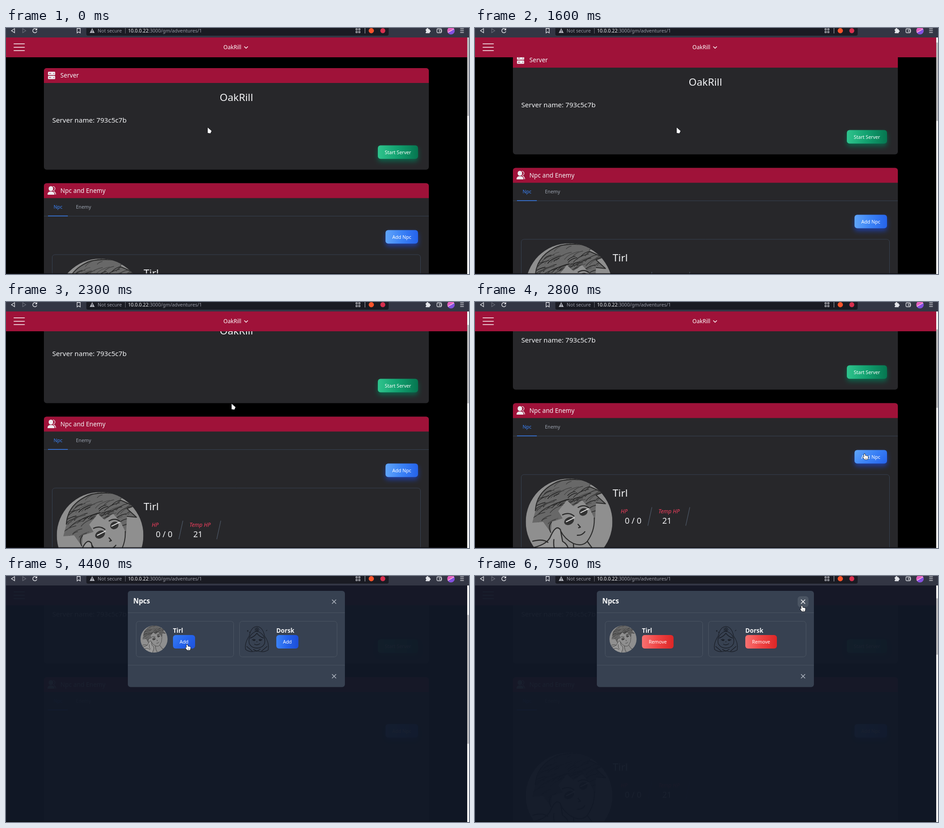
An HTML page with a canvas for the animation above (8 s loop, 1026 by 546 pixels).

```html
<!DOCTYPE html>
<html lang="en">
<head>
<meta charset="utf-8">
<title>Adventure manager</title>
<style>
html, body { margin: 0; width: 100%; height: 100%; overflow: hidden; background: #000; }
canvas { display: block; }
</style>
</head>
<body>
<canvas id="stage" width="1026" height="546"></canvas>
<script>
const ctx = document.getElementById('stage').getContext('2d');
const LOOP = 8000;
const ROSE = '#9f1239', PANEL = '#27272a', LINE = '#374151', SLATE = '#374151', EDGE = '#4b5563';
const RED = ['#f87171', '#ef4444', '#dc2626'];
const BLUE = ['#3b82f6', '#2563eb', '#1d4ed8'];
const SKY = ['#60a5fa', '#3b82f6', '#2563eb'];
const GREEN = ['#2fc48d', '#12a06f', '#067650'];
const ADVENTURE = 'OakRill', NPCS = ['Tirl', 'Dorsk'];

// time, scroll, pointer x, pointer y, shape
const POINTER = [
  [0, 0, 447, 221, 'arrow'],
  [1400, 10, 447, 221, 'arrow'],
  [1500, 22, 447, 221, 'arrow'],
  [1600, 34, 447, 221, 'arrow'],
  [1700, 40, 447, 221, 'arrow'],
  [1900, 56, 470, 221, 'arrow'],
  [2000, 70, 476, 222, 'arrow'],
  [2100, 80, 480, 223, 'arrow'],
  [2300, 90, 500, 226, 'arrow'],
  [2400, 103, 560, 244, 'arrow'],
  [2500, 115, 650, 276, 'arrow'],
  [2600, 120, 752, 310, 'arrow'],
  [2700, 120, 830, 330, 'arrow'],
  [2800, 120, 864, 337, 'hand'],
  [4100, 120, 402, 152, 'hand'],
  [5900, 120, 729, 114, 'arrow'],
  [6300, 120, 674, 165, 'arrow'],
  [6600, 120, 622, 148, 'hand'],
  [7200, 120, 727, 74, 'arrow'],
  [7500, 120, 725, 66, 'hand']
];

function text(str, x, y, size, color, font = '400', align = 'left') {
  ctx.font = `${font} ${size}px "Noto Sans", sans-serif`;
  ctx.textAlign = align;
  ctx.fillStyle = color;
  ctx.fillText(str, x, y);
}

function rect(x, y, w, h, color) {
  ctx.fillStyle = color;
  ctx.fillRect(x, y, w, h);
}

function round(x, y, w, h, r) {
  ctx.beginPath();
  ctx.roundRect(x, y, w, h, r);
}

function fillRound(x, y, w, h, r, color) {
  round(x, y, w, h, r);
  ctx.fillStyle = color;
  ctx.fill();
}

function strokeRound(x, y, w, h, r, color, width = 1) {
  round(x, y, w, h, r);
  ctx.strokeStyle = color;
  ctx.lineWidth = width;
  ctx.stroke();
}

function dot(x, y, r, color) {
  ctx.beginPath();
  ctx.arc(x, y, r, 0, Math.PI * 2);
  ctx.fillStyle = color;
  ctx.fill();
}

function path(points, color, width = 1, closed = false) {
  ctx.beginPath();
  points.forEach(([x, y]) => ctx.lineTo(x, y));
  if (closed) ctx.closePath();
  ctx.strokeStyle = color;
  ctx.lineWidth = width;
  ctx.stroke();
}

function polygon(points, color) {
  ctx.beginPath();
  points.forEach(([x, y]) => ctx.lineTo(x, y));
  ctx.closePath();
  ctx.fillStyle = color;
  ctx.fill();
}

function curve(d, color, width) {
  ctx.strokeStyle = color;
  ctx.lineWidth = width;
  ctx.stroke(new Path2D(d));
}

function random(seed) {
  return () => (seed = (seed * 16807) % 2147483647) / 2147483647;
}

function button(label, x, y, w, colors, hover, glow) {
  const h = 30;
  const g = hover ? ctx.createLinearGradient(x + w / 2 - 25, y - 10, x + w / 2 + 25, y + h + 10)
                  : ctx.createLinearGradient(x, y, x + w, y);
  colors.forEach((c, i) => g.addColorStop(i / 2, c));
  ctx.save();
  if (glow) {
    ctx.shadowColor = glow;
    ctx.shadowBlur = 11;
    ctx.shadowOffsetY = 6;
  }
  fillRound(x, y, w, h, 6, g);
  ctx.restore();
  text(label, x + w / 2, y + 19, 10.57, '#fff', '500', 'center');
}

function cross(x, y, color) {
  path([[x - 4.5, y - 4.5], [x + 4.5, y + 4.5]], color, 1.4);
  path([[x + 4.5, y - 4.5], [x - 4.5, y + 4.5]], color, 1.4);
}

function portrait(cx, cy, r) {
  ctx.save();
  ctx.translate(cx, cy);
  ctx.scale(r, r);
  ctx.beginPath();
  ctx.arc(0, 0, 1, 0, Math.PI * 2);
  ctx.clip();
  rect(-1, -1, 2, 2, '#8f8f8f');
  const ink = '#2b2b2b';
  ctx.save();
  const hair = new Path2D('M-.78-.25L-.72-.55-.5-.8-.3-.93 0-1 .3-.97 .56-.9 .46-.82 .78-.68 .62-.62 .84-.42 .62-.44 .6-.05 .48-.3 .3-.5 .1-.36-.05-.5-.25-.25-.15-.08-.4 0-.42.25-.6 0-.85.02Z');
  ctx.fillStyle = '#686868';
  ctx.fill(hair);
  ctx.clip(hair);
  const rnd = random(77);
  for (let i = 0; i < 110; i++) {
    const x = -.9 + rnd() * 1.8, y = -1 + rnd() * 1.1, l = .12 + rnd() * .3;
    const shade = 30 + Math.floor(rnd() * 50);
    curve(`M${x} ${y}q${l * .3} ${-l * .4} ${l} ${-l * .55}`, `rgb(${shade},${shade},${shade})`, .015);
  }
  ctx.restore();
  ctx.lineJoin = 'round';
  curve('M-.78-.25Q-.75-.75-.2-.95Q.25-1.03.56-.9M.46-.82L.78-.68 .62-.62 .84-.42 .62-.44M-.4 0Q-.5.1-.42.25M.58-.1Q.6.2.42.45Q.3.58.1.5Q-.1.4-.2.2', ink, .022);
  for (const [x, y, a] of [[0, -.02, .12], [.33, -.23, .1]]) {
    ctx.beginPath();
    ctx.ellipse(x, y, a, .085, -.5, 0, Math.PI * 2);
    ctx.fillStyle = '#333';
    ctx.fill();
    path([[x - .07, y + .02], [x + .13, y - .08]], '#ddd', .022);
  }
  curve('M-.16-.16Q0-.24.12-.13M.2-.33Q.35-.42.46-.32M.2.05l.06.07-.05.02M.18.31Q.3.32.37.22', ink, .026);
  ctx.fillStyle = '#999';
  const hand = new Path2D('M-.95.62Q-.5.55-.42.32Q-.3.05-.2.18L-.15.45Q.02.55-.02.75L-.15 1.1-.9 1.1Z');
  ctx.fill(hand);
  curve('M-.95.62Q-.5.55-.42.32Q-.3.05-.2.18L-.15.45Q.02.55-.02.75L-.15 1.1M-.85.45Q-.6.38-.48.48M-.35.4Q-.38.65-.25.75M-.7.72Q-.45.6-.3.8M.1.5Q.1.75.25 1M.42.45L.6.7Q.75.78.8.6', ink, .025);
  ctx.restore();
}

function hoodedFigure(cx, cy) {
  const ink = '#191d25';
  ctx.save();
  ctx.translate(cx, cy);
  ctx.lineJoin = 'round';
  curve('M-25 23Q-28 10-17-7Q-13-27 0-28Q13-27 17-7Q28 8 25 24Q15 31 0 26Q-15 31-25 23Z', ink, 1.2);
  curve('M-17 10Q-21-10 0-18Q21-10 17 10Q12 20 0 20Q-12 20-17 10Z', ink, 1.3);
  curve('M-15-2Q-5-6 0-13Q5-6 15-2M-11 2q4-3 8 0M4 2q4-3 8 0M-6 11Q0 15 7 10M-1 6h2M-23 16L-10 27M23 16L10 27M-8 23L0 27 8 22', ink, 1.4);
  curve('M-9 3h5M5 3h5', ink, 2);
  for (let i = 0; i < 5; i++) {
    const a = i * Math.PI * .4;
    ctx.beginPath();
    ctx.arc(Math.cos(a) * 3, -21 + Math.sin(a) * 3, 1.8, 0, Math.PI * 2);
    ctx.lineWidth = .9;
    ctx.stroke();
  }
  curve('M-22-18l3-1M-20-20v4M20-18l3-2M-17-16l2 2', ink, 1.1);
  ctx.restore();
}

function browserBar() {
  const light = '#e4e5ea', dim = '#9a9ca7';
  rect(0, 0, 1026, 21, '#333644');
  fillRound(178, -6, 670, 23, 4, '#1a1b23');
  path([[19, 1.5], [12, 6], [19, 10.5]], light, 1.3, true);
  path([[37, 1.5], [44, 6], [37, 10.5]], '#70737f', 1.1, true);
  ctx.beginPath();
  ctx.arc(64, 6, 4.6, .3, 5.4);
  ctx.strokeStyle = light;
  ctx.lineWidth = 1.5;
  ctx.stroke();
  polygon([[69, 0], [69, 5], [64.5, 5]], light);
  path([[157.5, 1], [164.5, 1], [164.5, 11], [161, 8.5], [157.5, 11]], light, 1.3, true);
  polygon([[191, .5], [196.5, 11], [185.5, 11]], '#b5b7bf');
  rect(190.4, 4, 1.2, 3.5, '#1a1b23');
  rect(190.4, 8.5, 1.2, 1.2, '#1a1b23');
  text('Not secure', 203, 10, 10.57, dim);
  rect(264, 0, 1, 12, '#6b6d77');
  const host = '10.0.0.22';
  text(host, 270.5, 10, 10.7, '#f3f4f6');
  text(':3000/gm/adventures/1', 270.5 + ctx.measureText(host).width, 10, 10.7, dim);
  for (const [x, y] of [[775.5, 1.5], [781.5, 1.5], [775.5, 7.5], [781.5, 7.5]]) {
    ctx.strokeStyle = '#c5c6cc';
    ctx.lineWidth = 1.2;
    ctx.strokeRect(x, y, 3, 3);
  }
  rect(795, 0, 1, 12, '#b5b7bf');
  dot(809.5, 6, 5.8, '#fb542b');
  dot(835, 6, 5.5, '#d8304f');
  fillRound(930, 2.5, 9, 9, 1, light);
  dot(934, 2.2, 2, light);
  dot(939, 7, 2, light);
  dot(930, 7.5, 1.4, '#333644');
  strokeRound(955, 2, 10, 8.5, 1.5, light, 1.3);
  strokeRound(960, 4.5, 5.5, 3.5, 1, light, 1.2);
  dot(986, 6, 8.2, '#e35fbd');
  ctx.beginPath();
  ctx.arc(986, 6, 8.2, -.45, 2.5);
  ctx.fillStyle = '#8250df';
  ctx.fill();
  path([[979, 10], [993, 2]], '#f2d4ee', 1.2);
  for (const y of [2, 6, 10]) rect(1006.5, y - .6, 8, 1.3, light);
}

function panelHead(y, title) {
  fillRound(84, y, 853, 33, [6, 6, 0, 0], ROSE);
  text(title, 120.5, y + 21.2, 13.6, '#f3f4f6');
}

function serverIcon(y) {
  for (const dy of [0, 9]) {
    fillRound(93, y + dy, 16, 7.5, 1.5, '#eceaee');
    rect(95.5, y + dy + 3.2, 4, 1.2, ROSE);
    dot(106, y + dy + 3.8, .9, ROSE);
  }
}

function peopleIcon(y) {
  const c = '#eceaee';
  ctx.beginPath();
  ctx.arc(104, y + 5.5, 4.6, -1.6, 1.6);
  ctx.strokeStyle = c;
  ctx.lineWidth = 1.4;
  ctx.stroke();
  curve(`M106 ${y + 12}Q110 ${y + 14} 110 ${y + 18.5}`, c, 1.6);
  ctx.beginPath();
  ctx.ellipse(99.5, y + 5.5, 5, 5.6, 0, 0, Math.PI * 2);
  ctx.fillStyle = c;
  ctx.fill();
  fillRound(92, y + 12, 15.5, 7, [6, 6, 1, 1], c);
}

function npcCard(y) {
  strokeRound(102.5, y + .5, 816, 640, 6, LINE);
  portrait(208.5, y + 105.5, 96);
  text(NPCS[0], 305, y + 49, 22.65, '#f3f4f6');
  text('HP', 323, y + 86, 12.1, '#f43f5e', 'italic 400');
  text('Temp HP', 406.5, y + 86, 12.1, '#f43f5e', 'italic 400');
  text('0 / 0', 332, y + 109.5, 18.1, '#f3f4f6');
  text('21', 415, y + 109.5, 18.1, '#f3f4f6');
  for (const x of [392, 476]) path([[x, y + 73], [x - 9, y + 114]], EDGE, 1.3);
}

function page(scroll, hover, hasNpc) {
  rect(0, 21, 1026, 525, '#000');
  ctx.save();
  ctx.translate(0, -scroll);
  fillRound(84, 89, 853, 225.5, 6, PANEL);
  panelHead(89, 'Server');
  serverIcon(97);
  text(ADVENTURE, 510.5, 161.5, 22.65, '#f3f4f6', '400', 'center');
  text('Server name: 793c5c7b', 102.5, 210, 15.1, '#f3f4f6');
  button('Start Server', 824, 260.5, 89, GREEN, false, 'rgba(6,110,80,.8)');

  fillRound(84, 344.5, 853, 900, 6, PANEL);
  panelHead(344.5, 'Npc and Enemy');
  peopleIcon(351);
  text('Npc', 105.5, 401, 10.57, '#3b82f6', '500');
  text('Enemy', 155, 401, 10.57, '#9ca3af', '500');
  rect(84, 417, 853, 1, LINE);
  rect(93, 416.5, 44, 1.5, '#3b82f6');
  button('Add Npc', 841, 448.5, 72, SKY, hover, 'rgba(30,64,175,.85)');
  if (hasNpc) npcCard(502.5);
  ctx.restore();

  rect(0, 21, 1022, 44, ROSE);
  for (const y of [35, 42.5, 50]) rect(17, y - .5, 24.5, 1.5, '#fff');
  text(ADVENTURE, 501.5, 47.2, 12.1, '#fff', '500', 'center');
  path([[528, 41], [532, 45], [536, 41]], '#fff', 1.5);
}

function scrollbar(scroll, height) {
  const ratio = 525 / height;
  rect(1022, 21, 4, 525, '#f4f4f4');
  rect(1022, 21 + scroll * ratio, 4, 525 * ratio, '#bdbdbf');
}

function modalCard(x, name, added, hover) {
  strokeRound(x + .5, 100.5, 216, 79, 6, EDGE);
  text(name, x + 82, 125.6, 13.6, '#f3f4f6', '600');
  if (added) button('Remove', x + 82, 131, 70, RED, hover);
  else button('Add', x + 82, 131, 49, BLUE, hover);
}

function modal(t, firstAdded) {
  rect(0, 21, 1022, 525, 'rgba(17,24,39,.96)');
  fillRound(270, 33, 481, 213.5, 6, SLATE);
  text('Npcs', 282, 61.3, 15.1, '#fff', '600');
  rect(270, 81, 481, 1, EDGE);
  rect(270, 197.5, 481, 1, EDGE);
  modalCard(288, NPCS[0], firstAdded, t < 5900);
  portrait(328, 140, 30);
  modalCard(517, NPCS[1], t >= 7200, t >= 6600 && t < 7200);
  hoodedFigure(556, 140);
  const closing = t >= 7500;
  if (closing) fillRound(715, 45, 24, 24, 6, EDGE);
  cross(727, 57, closing ? '#fff' : '#b3b9c4');
  cross(727, 222.5, '#b3b9c4');
}

function pointer(x, y, shape) {
  ctx.save();
  ctx.translate(x, y);
  ctx.lineJoin = 'round';
  const p = new Path2D(shape === 'arrow'
    ? 'M0 0L8.5 7.5 6 12.8 0 12Z'
    : 'M-2 .8Q-.8-.4.4.8L1 4.2 5.8 5Q7.2 5.4 7 7L6 12.5-.6 12.5-4 8Q-4.2 6.2-2.4 6.6L-1.6 7Z');
  ctx.strokeStyle = '#15161a';
  ctx.lineWidth = 1.6;
  ctx.stroke(p);
  ctx.fillStyle = '#fff';
  ctx.fill(p);
  if (shape === 'hand') curve('M1.6 9v2M3.4 9v2', '#333', .7);
  ctx.restore();
}

function draw(t) {
  const [, scroll, x, y, shape] = POINTER.findLast(k => t >= k[0]);
  const open = t >= 4100;
  const firstAdded = t < 4400 || t >= 5900;
  page(scroll, t >= 2800 && !open, firstAdded);
  if (open) modal(t, firstAdded);
  scrollbar(scroll, !firstAdded ? 964 : t >= 7200 ? 2205 : 1584);
  browserBar();
  rect(0, 544.5, 1022, 1.5, '#0c0d11');
  pointer(x, y, shape);
}

const start = performance.now();
function tick() {
  draw((performance.now() - start) % LOOP);
  requestAnimationFrame(tick);
}
tick();
</script>
</body>
</html>
```
